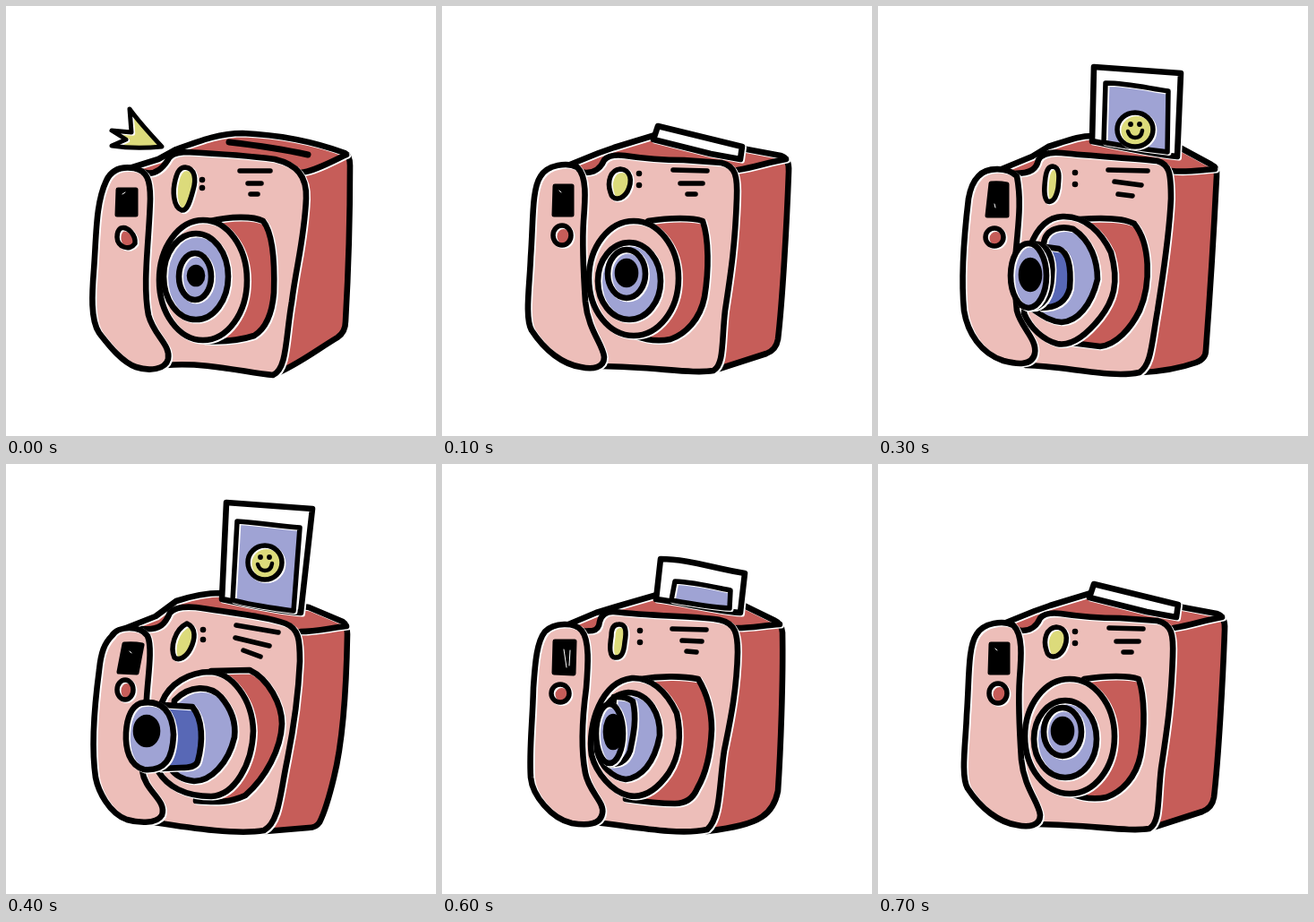
These frames come from a looping animation (480 by 480 pixels, 0.8 s). An HTML page with a canvas:

```html
<!DOCTYPE html>
<html lang="en">
<head>
<meta charset="utf-8">
<title>Instant camera</title>
<style>
  html, body { margin: 0; height: 100%; overflow: hidden; background: #fff; }
  canvas { display: block; width: 100vw; height: 100vh; }
</style>
</head>
<body>
<canvas id="stage" width="480" height="480"></canvas>
<script>
const ctx = document.getElementById('stage').getContext('2d');
const PINK = '#edbeb9', RED = '#c65d59', BLUE = '#9fa3d4', DARK = '#5868b6', YELLOW = '#dcdb7b';
const STEP = 100;

const oval = (x, y, rx, ry) =>
  `M${x - rx} ${y}a${rx} ${ry} 0 1 1 ${2 * rx} 0a${rx} ${ry} 0 1 1 ${-2 * rx} 0z`;

// Each pose: lens parts are listed from back to front as [path, colour].
const closed = {
  back: 'M138 181L170 171L190 160C220 149 240 142 264 142C310 144 345 152 378 164Q384 167 384 178C384 240 382 300 379 352Q379 364 370 370C345 385 325 401 298 412L170 395Z',
  edge: 'M329 186C345 184 362 174 380 166',
  slot: 'M249 152C275 155 310 160 337 166',
  front: 'M150 184C162 190 172 185 180 173C183 166 188 164 200 163C240 165 270 167 300 171C325 177 336 190 335 215C333 260 324 290 319 330C312 370 314 405 298 412C270 410 225 397 178 401L140 385L140 200Z',
  grip: 'M112 195C118 182 130 179 143 181C158 184 161 195 161 215C160 260 152 310 159 345C165 368 184 378 181 394C178 406 160 408 145 403C128 397 112 375 104 365C94 350 96 320 98 295C101 255 100 220 112 195Z',
  window: 'M125 205L145 205L145 233L124 233Z',
  mark: 'M130 210L133 208',
  button: 'M128 248C136 245 145 256 144 265C138 274 124 269 124 258Q124 251 128 248Z',
  flash: 'M200 180C212 181 212 195 209 205C205 220 202 229 196 228C186 224 186 205 189 194C191 185 194 180 200 180Z',
  dots: [[219, 194], [219, 203]],
  lines: 'M261 184H295M270 198H285M273 210H281',
  lens: [
    ['M228 240C250 235 275 234 287 240C299 255 300 290 299 320C297 345 290 360 277 368C262 373 240 375 222 374Z', RED],
    [oval(220, 306, 49, 67), PINK],
    [oval(212, 302, 36, 48), BLUE],
    [oval(211, 302, 18, 26), BLUE],
    [oval(212, 301, 7, 9), '#000']
  ],
  spark: 'M138 115C146 126 160 142 174 157C154 159 137 159 118 156L134 149L118 139L140 141Z'
};

const start = {
  back: 'M138 179L175 164L192 158L238 144L335 159L378 167Q388 170 387 185C385 240 380 330 375 372Q373 384 362 388L303 407L180 400Z',
  edge: 'M330 183C350 180 365 174 384 171',
  photo: 'M241 134L335 157L333 171L300 165L236 149Z',
  front: 'M150 184C165 189 176 184 181 172Q187 165 204 167C230 171 250 172 270 172L312 175C328 179 330 190 329 215C327 270 322 300 316 340C312 375 315 400 303 407C280 411 240 403 178 402L140 385L140 200Z',
  grip: 'M110 190C118 177 140 174 151 180C162 190 160 215 158 240C156 270 158 300 160 330C163 362 180 378 181 392C181 404 168 406 155 403C135 400 115 385 100 362C92 348 98 310 99 280C102 240 100 205 110 190Z',
  window: 'M126 201L145 201L145 233L125 233Z',
  mark: 'M131 206L133 208',
  button: oval(134, 256, 10, 11),
  flash: 'M199 182C211 183 213 195 207 207C201 217 190 218 188 208C184 196 188 183 199 182Z',
  dots: [[220, 187], [220, 200]],
  lines: 'M258 183L296 184M266 198H291M274 210H283',
  lens: [
    ['M230 240C255 236 280 236 291 240C298 260 298 295 293 325C288 350 272 366 255 372C240 375 228 373 215 368Z', RED],
    [oval(214, 304, 50, 64), PINK],
    [oval(209, 307, 35, 43), BLUE],
    [oval(206, 299, 21, 27), BLUE],
    [oval(206, 298, 10, 13), '#000']
  ]
};

const half = {
  back: 'M134 182L172 166L195 159L240 146L333 156L372 175Q379 178 380 188C381 240 378 320 375 365Q371 385 357 394C345 402 325 406 296 410L180 401Z',
  edge: 'M329 183C345 183 360 180 377 179',
  photo: 'M244 106C275 106 305 117 338 122L333 166C300 163 270 155 239 151Z',
  picture: 'M256 152L260 131C282 132 302 137 322 141L321 161C300 160 278 156 256 152Z',
  front: 'M154 187L168 186Q175 185 176 176Q179 164 192 165C235 170 290 170 310 174C328 178 330 190 330 210C329 255 321 290 315 320C309 360 311 395 296 408C265 415 215 405 172 400L140 385L140 200Z',
  grip: 'M115 187C125 177 148 176 156 186C165 197 163 225 161 250C157 280 154 315 160 345C164 366 182 378 179 390C177 402 163 404 145 401C122 396 101 370 99 350C97 320 101 290 102 250C104 220 106 198 115 187Z',
  window: 'M126 198L148 198L147 234L125 233Z',
  mark: 'M136 207L139 227M143 208L142 225',
  button: oval(132, 256, 10, 10),
  flash: 'M197 179C206 178 206 188 204 199C203 211 200 217 193 216C187 215 187 204 189 192C189 184 191 179 197 179Z',
  dots: [[221, 186], [221, 199]],
  lines: 'M257 184L295 185M268 197L290 198M273 209L284 210',
  lens: [
    ['M222 240C245 236 270 237 286 240C295 255 301 275 301 296C300 320 295 345 285 362C280 374 272 379 260 379C240 379 225 377 205 374Z', RED],
    ['M212 239C232 238 250 252 262 278C267 300 266 325 253 345C241 362 226 374 208 370C190 366 172 345 167 325C162 290 178 243 212 239Z', PINK],
    ['M208 255C232 256 244 280 243 303C237 335 222 350 205 352C190 350 178 338 173 320C170 285 184 257 208 255Z', BLUE],
    ['M192 260Q205 259 213 265C218 285 213 305 210 320C205 334 196 335 186 335Z', BLUE],
    [oval(187, 301, 15, 33), BLUE],
    [oval(191, 299, 8, 17), '#000']
  ]
};

const most = {
  back: 'M138 182L172 168L190 157C215 149 225 145 240 145L335 157L372 177Q379 180 378 190C375 250 370 330 366 384Q366 394 355 398C335 405 315 408 294 409L170 400Z',
  edge: 'M327 184C345 186 360 183 376 182',
  photo: 'M241 68L338 75L334 168C300 164 270 157 239 151Z',
  picture: 'M252 152L254 86C280 86 302 92 324 95L323 163C300 160 275 157 252 152Z',
  face: [287, 138, 20, 19],
  front: 'M152 187C172 187 177 181 179 172Q184 162 205 164C245 168 285 170 312 173C325 177 327 185 327 215C325 260 318 300 312 340C305 380 305 400 292 409C260 416 210 402 165 401L140 385L140 200Z',
  grip: 'M112 190C122 179 145 180 155 190C160 215 157 240 155 262C151 300 153 320 155 340C160 360 178 372 175 388C172 402 155 400 140 396C115 388 100 365 96 340C92 300 98 240 101 215Q104 198 112 190Z',
  window: 'M126 198Q135 197 144 199L144 234L122 234Z',
  mark: 'M130 221L131 225',
  button: oval(130, 258, 10, 10),
  flash: 'M195 179C204 180 202 193 201 203C199 214 195 220 189 218C184 212 186 199 187 191C188 184 190 179 195 179Z',
  dots: [[220, 186], [220, 199]],
  lines: 'M257 183L301 184M264 196L294 200M268 210L284 212',
  lens: [
    ['M225 238C250 236 275 237 286 243C304 265 305 310 292 340C282 360 266 378 248 380L200 374Z', RED],
    ['M206 235C232 234 250 254 260 275C270 310 262 330 248 348C232 368 215 380 200 377C185 373 170 360 163 343L170 268Q182 236 206 235Z', PINK],
    ['M185 265C187 248 205 245 218 249C238 262 245 285 245 305C238 335 222 352 205 353C190 352 180 343 172 338Z', BLUE],
    ['M180 268L202 271C212 275 216 290 214 315C210 330 200 337 182 337Z', DARK],
    ['M172 266C190 263 196 282 194 302C193 324 184 337 170 337Z', BLUE],
    [oval(168, 301, 20, 36), BLUE],
    [oval(170, 300, 10, 16), '#000']
  ]
};

const full = {
  back: 'M134 183L167 170L190 153C205 148 220 144 240 144L338 160L376 176Q381 179 381 190C380 250 376 310 366 350C360 375 355 390 350 400Q346 406 338 406L290 410L170 400Z',
  edge: 'M329 187C345 187 362 183 380 181',
  photo: 'M246 43L342 50L329 166C300 164 270 157 241 151Z',
  picture: 'M253 152L258 64C282 65 305 70 328 71L321 164C300 161 275 158 253 152Z',
  face: [289, 110, 19, 19],
  front: 'M152 184C172 186 178 178 183 166Q190 158 212 160C250 166 290 170 312 178C327 184 328 196 328 220C326 265 320 300 314 330C306 368 305 400 288 409C260 414 210 407 165 400L140 385L140 200Z',
  grip: 'M118 192C125 180 150 180 158 192C164 205 158 240 157 262C148 300 148 320 152 342C155 366 180 375 174 392C168 403 145 400 135 397C115 390 103 365 100 350C94 310 100 260 104 230C106 210 110 200 118 192Z',
  window: 'M132 201Q143 200 152 202L146 233L126 232Z',
  mark: 'M138 209L140 211',
  button: oval(133, 252, 9, 11),
  flash: 'M202 178C213 183 211 196 206 206C201 216 193 220 188 216C183 205 188 185 202 178Z',
  dots: [[220, 185], [220, 196]],
  lines: 'M257 180L304 188M256 194L294 203M265 208L284 215',
  lens: [
    ['M229 231L272 230C293 240 308 268 308 290C307 318 290 350 267 370C250 378 235 378 212 376Z', RED],
    ['M174 266C182 245 205 232 228 232C252 233 275 262 276 298C275 335 255 370 229 371C200 371 180 360 170 343Z', PINK],
    ['M188 264C205 246 228 247 240 260C252 274 257 288 255 305C248 335 228 354 210 354C198 353 188 347 182 338Z', BLUE],
    ['M176 269L208 271C220 285 220 310 214 332C212 338 205 339 195 339L172 340Z', DARK],
    ['M150 267C175 262 186 278 187 302C186 330 177 343 154 341C138 337 133 318 134 300C135 283 140 271 150 267Z', BLUE],
    [oval(157, 298, 12, 15), '#000']
  ]
};

const order = [closed, start, half, most, full, most, half, start];

function line(d, color = '#000', width = 6.6) {
  ctx.strokeStyle = color;
  ctx.lineWidth = width;
  ctx.stroke(new Path2D(d));
}

// Filled shape with an ink outline and a thin white rim on its lower right.
function shape(d, fill, width = 6.6) {
  ctx.fillStyle = fill;
  ctx.fill(new Path2D(d));
  if (fill !== '#000') {
    ctx.save();
    ctx.translate(1.7, 1.3);
    line(d, '#fff', width);
    ctx.restore();
  }
  line(d, '#000', width);
}

function dot(x, y, r) {
  ctx.fillStyle = '#000';
  ctx.fill(new Path2D(oval(x, y, r, r)));
}

function smiley(x, y, rx, ry) {
  shape(oval(x, y, rx, ry), YELLOW, 5.5);
  dot(x - 5, y - 6, 2.9);
  dot(x + 5, y - 6, 2.9);
  line(`M${x - 8} ${y + 2}Q${x - 6} ${y + 9} ${x} ${y + 9}Q${x + 7} ${y + 9} ${x + 8} ${y + 1}`, '#000', 4.5);
}

function draw(p) {
  ctx.fillStyle = '#fff';
  ctx.fillRect(0, 0, 480, 480);
  shape(p.back, RED);
  shape(p.edge, 'transparent');
  if (p.slot) line(p.slot, '#000', 7);
  if (p.photo) shape(p.photo, '#fff');
  if (p.picture) shape(p.picture, BLUE, 5.5);
  if (p.face) smiley(...p.face);
  shape(p.front, PINK);
  shape(p.grip, PINK);
  shape(p.window, '#000', 5);
  line(p.mark, '#fff', 1);
  shape(p.button, RED, 5.5);
  shape(p.flash, YELLOW, 5.5);
  p.dots.forEach(([x, y]) => dot(x, y, 3.3));
  line(p.lines, '#000', 5.5);
  p.lens.forEach(([d, fill]) => shape(d, fill));
  if (p.spark) shape(p.spark, YELLOW, 5);
}

function tick(now) {
  draw(order[Math.floor(now / STEP) % order.length]);
  requestAnimationFrame(tick);
}

ctx.lineCap = ctx.lineJoin = 'round';
draw(closed);
requestAnimationFrame(tick);
</script>
</body>
</html>
```
